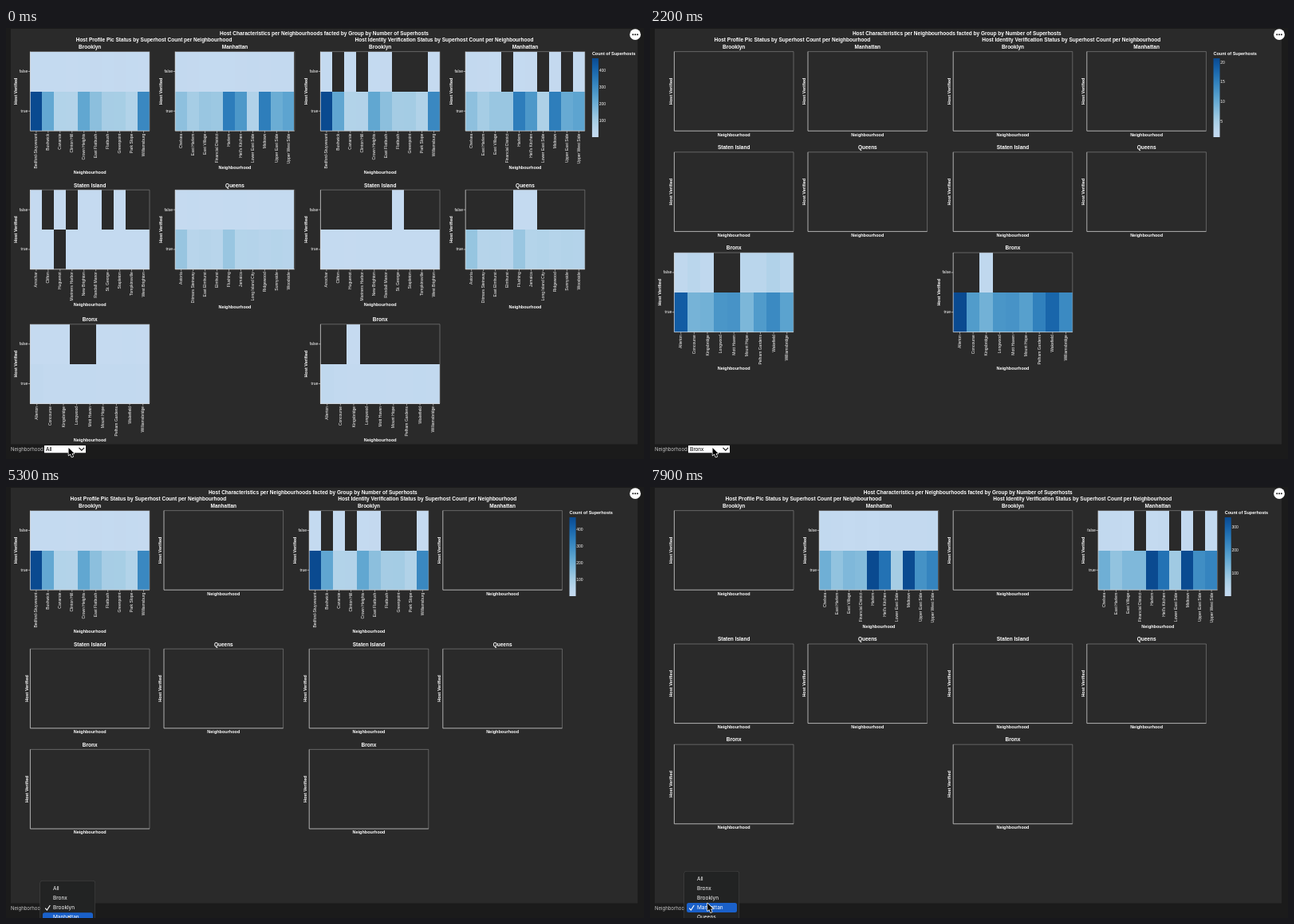
Animation, 800 px wide and 541 px high, one loop 8 s. Source, as an HTML page with a canvas:

```html
<!DOCTYPE html>
<html lang="en">
<head>
<meta charset="utf-8">
<title>Superhost heatmaps</title>
<style>
  html, body { margin: 0; width: 100%; height: 100%; overflow: hidden; background: #1b1b1b; }
  canvas { display: block; width: 800px; height: 541px; }
</style>
</head>
<body>
<canvas id="stage"></canvas>
<script>
const W = 800, H = 541, LOOP = 8000;
const canvas = document.getElementById('stage');
const ctx = canvas.getContext('2d');
const dpr = window.devicePixelRatio || 1;
canvas.width = W * dpr;
canvas.height = H * dpr;

const SANS = '"Liberation Sans", Arial, sans-serif';
const UI = 'Inter, "Open Sans", sans-serif';
const LEFT = 30.4, TOP = 29.6, PW = 149.6, PH = 99.6;
const AXIS = 14.2, COL = 167.6, ROW = 126.2;
const BLUES = ['#c5daf0', '#bad6ec', '#a8cee5', '#8fc1de', '#74b2d7', '#5ba3cf',
  '#4592c6', '#3181bd', '#206fb2', '#125ca4', '#0a4a90'];
const RGB = BLUES.map(c => [1, 3, 5].map(i => parseInt(c.slice(i, i + 2), 16)));

// base and peaks shape the totals; few is the usual size of a "false" cell.
// gaps: no "false" cell in the left group; kept: the only ones in the right group.
const facets = [
  { name: 'Brooklyn', row: 0, col: 0, base: 72, few: 6, gaps: [], kept: [0, 2, 4, 5, 9],
    peaks: { 0: 480, 1: 228, 4: 230, 5: 156, 6: 102, 7: 104, 9: 315 },
    labels: ['Bedford-Stuyvesant', 'Bushwick', 'Canarsie', 'Clinton Hill', 'Crown Heights',
      'East Flatbush', 'Flatbush', 'Greenpoint', 'Park Slope', 'Williamsburg'] },
  { name: 'Manhattan', row: 0, col: 1, base: 115, few: 8, gaps: [], kept: [0, 1, 2, 4, 5, 7, 9],
    peaks: { 0: 155, 4: 348, 5: 275, 6: 80, 7: 348, 8: 215, 9: 245 },
    labels: ['Chelsea', 'East Harlem', 'East Village', 'Financial District', 'Harlem',
      "Hell's Kitchen", 'Lower East Side', 'Midtown', 'Upper East Side', 'Upper West Side'] },
  { name: 'Staten Island', row: 1, col: 0, base: 6, few: 0.5, gaps: [1, 3, 6, 8, 9], kept: [6],
    peaks: { 2: 1 },
    labels: ['Arrochar', 'Clifton', 'Huguenot', 'Mariners Harbor', 'New Brighton',
      'Randall Manor', 'St. George', 'Stapleton', 'Tompkinsville', 'West Brighton'] },
  { name: 'Queens', row: 1, col: 1, base: 62, few: 4, gaps: [], kept: [4, 5],
    peaks: { 0: 130, 4: 128 },
    labels: ['Astoria', 'Ditmars Steinway', 'East Elmhurst', 'Elmhurst', 'Flushing',
      'Jamaica', 'Long Island City', 'Ridgewood', 'Sunnyside', 'Woodside'] },
  { name: 'Bronx', row: 2, col: 0, base: 12, few: 3, gaps: [3, 4], kept: [2],
    peaks: { 0: 21, 6: 15, 7: 18, 8: 14 },
    labels: ['Allerton', 'Concourse', 'Kingsbridge', 'Longwood', 'Mott Haven',
      'Mount Hope', 'Pelham Gardens', 'Wakefield', 'Williamsbridge'] }
];

const options = ['All', 'Bronx', 'Brooklyn', 'Manhattan', 'Queens', 'Staten Island'];
const sessions = [
  { open: 300, done: 1100, pick: 'Bronx' },
  { open: 2400, done: 3450, pick: 'Brooklyn' },
  { open: 4600, done: 5550, pick: 'Manhattan' }
];
const LAST_OPEN = 7400;

const rand = n => { const v = Math.sin(n * 12.9898) * 43758.5453; return v - Math.floor(v); };
const ease = (t, a, b) => { const p = Math.max(0, Math.min(1, (t - a) / (b - a))); return p * p * (3 - 2 * p); };

facets.forEach((f, k) => {
  const total = f.labels.map((_, i) => f.peaks[i] ?? f.base * (0.88 + 0.24 * rand(k * 10 + i + 1)));
  const unsure = f.labels.map((_, i) => Math.max(1, Math.round(f.few * (0.5 + rand(k * 10 + i + 70)))));
  f.data = [i => !f.gaps.includes(i), i => f.kept.includes(i)].map(shown => {
    const no = unsure.map((v, i) => shown(i) ? v : 0);
    return [no, total.map((v, i) => v - no[i])];
  });
  ctx.font = `5px ${SANS}`;
  f.drop = Math.max(...f.labels.map(s => ctx.measureText(s).width)) + 3.5;
});

// Plots shift right or down to make room for the labels of visible axes.
function layout(pick) {
  const on = facets.filter(f => pick === 'All' || f.name === pick);
  const has = col => on.some(f => f.col === col);
  const rows = [TOP];
  for (let r = 0; r < 2; r++)
    rows.push(rows[r] + ROW + Math.max(0, ...on.filter(f => f.row === r).map(f => f.drop)));
  const left = has(0) ? 9.3 : 23;
  const right = LEFT + COL + PW + (has(1) ? AXIS : 0);
  const shift = 349.8 + (has(0) && has(1) ? AXIS : 0);
  const legend = right + shift + 9.1;
  const max = Math.max(...on.flatMap(f => f.data.flat(2)));
  return { on, rows, shift, legend, max, step: max > 50 ? 100 : 5,
    head: (left + right) / 2, title: (left + legend + 53.8) / 2 };
}
const views = Object.fromEntries(['All', ...sessions.map(s => s.pick)].map(p => [p, layout(p)]));

function text(str, x, y, size, { bold, align = 'center', color = '#fff', font = SANS, turn } = {}) {
  ctx.save();
  ctx.translate(x, y);
  if (turn) ctx.rotate(-Math.PI / 2);
  ctx.font = `${bold ? 'bold ' : ''}${size}px ${font}`;
  ctx.textAlign = align;
  ctx.textBaseline = 'middle';
  ctx.fillStyle = color;
  ctx.fillText(str, 0, 0);
  ctx.restore();
}

function line(color, width, ...pts) {
  ctx.beginPath();
  for (let i = 0; i < pts.length; i += 2) ctx.lineTo(pts[i], pts[i + 1]);
  ctx.strokeStyle = color;
  ctx.lineWidth = width;
  ctx.stroke();
}

function box(x, y, w, h, color, r = 0) {
  ctx.fillStyle = color;
  ctx.beginPath();
  ctx.roundRect(x, y, w, h, r);
  ctx.fill();
}

function dot(x, y, r, color) {
  box(x - r, y - r, 2 * r, 2 * r, color, r);
}

function shade(v, max) {
  const p = Math.max(0, Math.min(1, (v - 1) / (max - 1))) * (RGB.length - 1);
  const i = Math.min(RGB.length - 2, Math.floor(p));
  return `rgb(${RGB[i].map((c, k) => Math.round(c + (RGB[i + 1][k] - c) * (p - i)))})`;
}

function cells(facet, group, x, y, max) {
  const cw = PW / facet.labels.length;
  const ex = i => Math.floor(x + i * cw + 0.2), ey = r => Math.round(y + r * PH / 2 + 0.1);
  facet.data[group].forEach((vals, r) => vals.forEach((v, i) => {
    if (v > 0) box(ex(i), ey(r), ex(i + 1) - ex(i), ey(r + 1) - ey(r), shade(v, max));
  }));
}

function axes(facet, x, y) {
  const cw = PW / facet.labels.length, bottom = y + PH;
  ['false', 'true'].forEach((s, i) => {
    const ty = y + PH * (0.25 + i / 2);
    text(s, x - 3.2, ty + 0.2, 5, { align: 'right' });
    line('#ddd', 0.6, x - 2.6, ty, x, ty);
  });
  facet.labels.forEach((s, i) => {
    const tx = x + (i + 0.5) * cw;
    text(s, tx + 0.2, bottom + 3.5, 5, { align: 'right', turn: true });
    line('#ddd', 0.6, tx, bottom, tx, bottom + 2.6);
  });
}

function plot(facet, group, view) {
  const on = view.on.includes(facet);
  const x = LEFT + group * view.shift + facet.col * (COL + (on ? AXIS : 0));
  const y = view.rows[facet.row], mid = x + PW / 2, bottom = y + PH;
  if (on) {
    cells(facet, group, x, y, view.max);
    axes(facet, x, y);
  }
  line('#8a8a8a', 0.6, x, y, x + PW, y, x + PW, bottom);
  line('#d4d4d4', 0.8, x, y, x, bottom, x + PW, bottom);
  text(facet.name, mid, y - 5.5, 6.5, { bold: true });
  text('Neighbourhood', mid, bottom + 4.8 + (on ? facet.drop : 0), 5.5, { bold: true });
  text('Host Verified', x - (on ? 18.2 : 4.3), y + PH / 2, 5.5, { bold: true, turn: true });
}

function legend({ legend: x, max, step }) {
  const top = 38, h = 99;
  text('Count of Superhosts', x, 32.7, 5.5, { bold: true, align: 'left' });
  const grad = ctx.createLinearGradient(0, top + h, 0, top);
  BLUES.forEach((c, i) => grad.addColorStop(i / (BLUES.length - 1), c));
  box(x, top, 8, h, grad);
  for (let v = step; v <= max; v += step)
    text(v, x + 8.8, top + h * (max - v) / (max - 1) + 0.2, 5, { align: 'left' });
}

function menuButton() {
  dot(789, 8.2, 6.9, '#fff');
  for (const dx of [-2.8, 0, 2.8]) dot(789 + dx, 8.2, 1, '#1b1b1b');
}

function select(pick) {
  text('Neighborhood:', 6, 529, 6, { align: 'left', color: '#c4c4c4', font: UI });
  box(48, 524, 52, 9.2, '#fff', 0.5);
  text(pick, 50, 528.9, 6.6, { align: 'left', color: '#000' });
  line('#111', 1.1, 91.5, 526.8, 94.8, 530.2, 98.1, 526.8);
}

function menu(pick, py) {
  const pitch = 12.2, sel = options.indexOf(pick), first = 528 - sel * pitch;
  const h = pitch * options.length + 6;
  box(42.5, first - 9.5, 69.5, h + 1, '#484848', 3.5);
  box(43, first - 9, 68.5, h, '#222323', 3);
  const hot = Math.round((py - first) / pitch);
  options.forEach((s, i) => {
    const y = first + i * pitch;
    if (i === hot) box(46, y - 6, 63, 12, '#1a60c9', 2.5);
    if (i === sel) line('#fff', 1.1, 49.2, y + 0.6, 51.4, y + 3, 55.3, y - 3);
    text(s, 59, y + 0.2, 6.5, { align: 'left', font: UI });
  });
}

// The pointer dips to the next option in each session, then returns.
function pointerAt(t) {
  let x = 72, y = 527 - 4.5 * ease(t, LAST_OPEN, 7850);
  for (const { open, done } of sessions) {
    x += 6.5 * ease(t, open - 600, open - 300) * (1 - ease(t, done - 150, done + 100));
    y += 12.3 * ease(t, open + 100, open + 500) * (1 - ease(t, done + 400, done + 1000));
  }
  return [x, y];
}

function arrow(x, y) {
  ctx.save();
  ctx.translate(x, y);
  const path = new Path2D('M0 0V9.6L2.2 7.6L3.9 11.6L5.7 10.8L4 7H7Z');
  ctx.lineJoin = 'round';
  ctx.strokeStyle = '#fff';
  ctx.lineWidth = 1.4;
  ctx.stroke(path);
  ctx.fillStyle = '#000';
  ctx.fill(path);
  ctx.restore();
}

function draw(t) {
  const pick = sessions.filter(s => s.done <= t).pop()?.pick ?? 'All';
  const view = views[pick];
  const [px, py] = pointerAt(t);
  ctx.setTransform(dpr, 0, 0, dpr, 0, 0);
  box(0, 0, W, H, '#1b1b1b');
  box(6, 1, 786, 521.5, '#2a2a2a');
  text('Host Characteristics per Neighbourhoods facted by Group by Number of Superhosts',
    view.title, 6.8, 6.5, { bold: true });
  ['Host Profile Pic Status', 'Host Identity Verification Status'].forEach((s, g) => {
    text(`${s} by Superhost Count per Neighbourhood`, view.head + g * view.shift, 15.4, 6.5, { bold: true });
    facets.forEach(f => plot(f, g, view));
  });
  legend(view);
  menuButton();
  select(pick);
  if (t >= LAST_OPEN || sessions.some(s => t >= s.open && t < s.done - 60)) menu(pick, py);
  arrow(px, py);
}

function tick() {
  draw(performance.now() % LOOP);
  requestAnimationFrame(tick);
}
tick();
</script>
</body>
</html>
```
